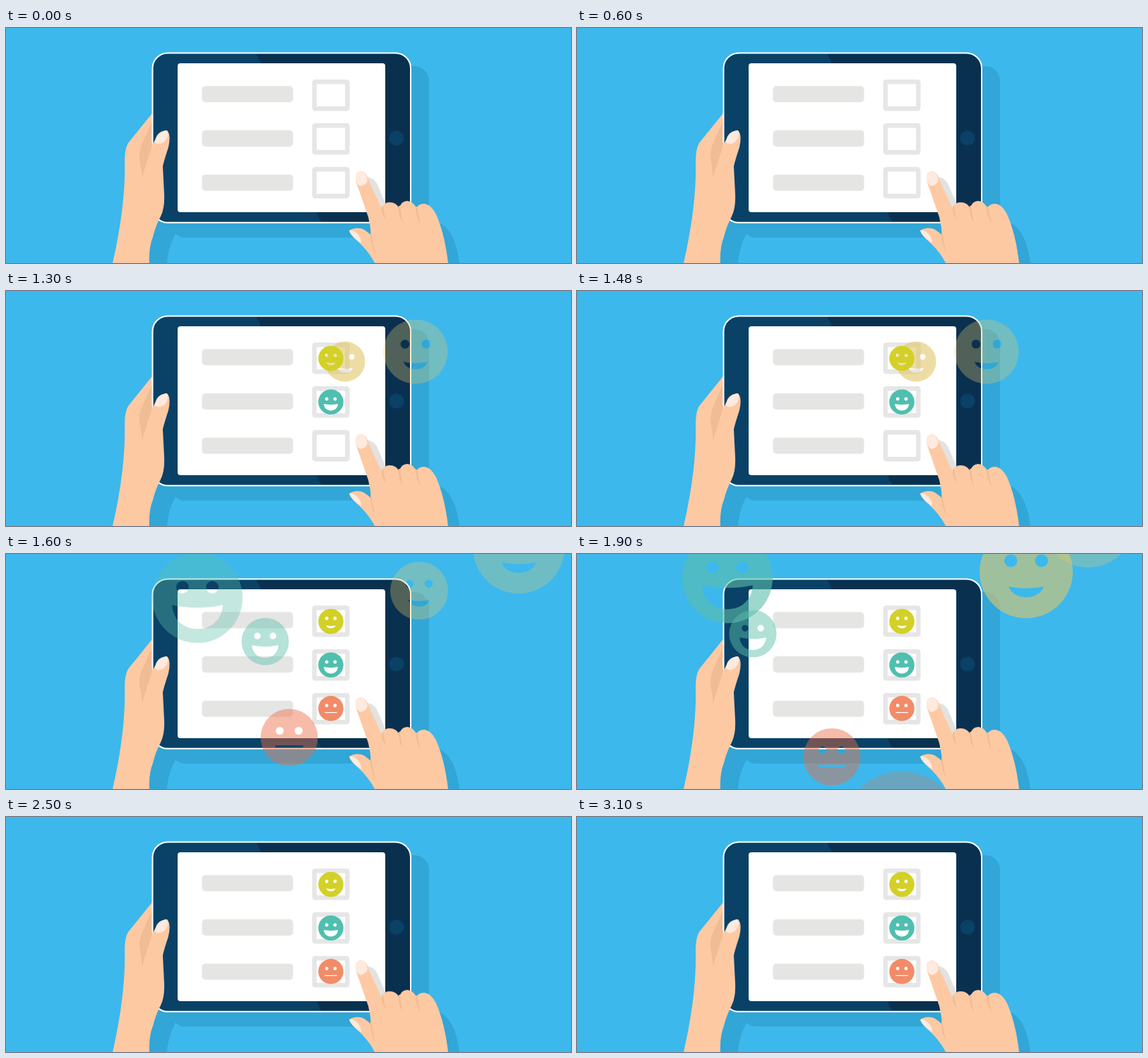
An HTML page for the animation above (3500 ms loop, 800 by 333 pixels).

```html
<!DOCTYPE html>
<html lang="en">
<head>
<meta charset="utf-8">
<title>Tablet survey</title>
<style>
  html, body { margin: 0; width: 100%; height: 100%; overflow: hidden; background: #3cb8ec; }
  svg { display: block; width: 100%; height: 100%; }
  .shadow { fill: #32a6d6; }
  .skin { fill: #fdc9a3; }
  .crease { fill: #efbc94; }
  .nail { fill: #feeade; }
</style>
</head>
<body>
<svg viewBox="0 0 800 333">
  <defs>
    <clipPath id="body"><rect x="208" y="36" width="364.5" height="239.5" rx="21"/></clipPath>
  </defs>

  <g class="shadow">
    <rect x="233" y="54" width="366" height="243" rx="21"/>
    <path d="M195 333V270H250L240 291Q229 312 228 333Z"/>
    <path d="M600 276H613Q636 286 642 333H600Z"/>
  </g>

  <!-- Fingers behind the tablet -->
  <path class="skin" d="M210 117L173 163Q168 171 168 190L210 220Z"/>
  <path class="crease" d="M210 125L193 163Q188 173 189 188L193 210L210 170Z"/>

  <rect x="207.5" y="35.5" width="365.5" height="240.3" rx="21.5" fill="#0a4166"/>
  <path d="M353 34Q359 45 361 51L440 261Q442 268 448 277H575V34Z" fill="#0a3050" clip-path="url(#body)"/>
  <rect x="207.5" y="35.5" width="365.5" height="240.3" rx="21.5" fill="none" stroke="#fff" stroke-width="2"/>
  <rect x="243" y="50" width="294" height="211" rx="4" fill="#fff"/>
  <circle cx="553" cy="156" r="10.5" fill="#0a4166"/>
  <g id="rows"></g>
  <path d="M509 211Q519 211 525 220L537 248V261H525Z" fill="#e2e2e1"/>

  <g id="floating"></g>
  <g id="answers"></g>

  <!-- Left hand -->
  <path class="skin" d="M168 186Q170 250 151 333H203Q202 311 208 296Q212 280 219 267Q225 255 224 235L222 196Q224 187 230 169Q234 151 228 145Q219 146 213 155Q209 162 207 166L193 210L189 184Z"/>
  <path class="crease" d="M189 182L193 210L196 193L207 166V162Z"/>
  <path class="nail" d="M211 162Q212 147 227 145Q231 148 228 156Q222 166 214 164Z"/>

  <!-- Right hand -->
  <path class="skin" d="M522 333Q515 319 501 305Q487 293 486 287Q493 282 503 284Q511 287 517 294Q516 280 513 268L496 219Q492 204 503 203Q510 204 514 217L532 256Q534 247 543 247Q553 247 557 256Q558 246 568 245Q578 246 581 256Q583 249 592 249Q602 250 609 264Q621 291 626 333Z"/>
  <path class="crease" d="M532 253Q531 263 538 272Q535 263 534 252ZM556 252Q555 265 562 276Q559 264 558 252ZM580 253Q580 266 587 277Q584 265 582 253ZM516 288Q515 303 523 319Q519 303 518 294Z"/>
  <path class="nail" d="M495 215Q493 204 503 203Q509 204 512 215Q511 222 502 224Q497 222 495 215ZM486 287Q490 285 497 291Q503 297 503 305Q488 295 486 287Z"/>
</svg>
<script>
const LOOP = 3500;
const STEPS = [0, 1000, 1300, 1600, 1900, 2200, 2500];

// Unit-radius faces; eyes and mouths are holes.
const circle = (x, y, r) => `M${x - r} ${y}a${r} ${r} 0 1 0 ${2 * r} 0a${r} ${r} 0 1 0 ${-2 * r} 0Z`;
const head = circle(0, 0, 1) + circle(-.33, -.235, .138) + circle(.33, -.235, .138);
const FACES = {
  smile: { solid: '#d3d027', faded: '#e1c76a', path: head + 'M-.38 .32Q0 .4 .38 .32Q.28 .55 0 .55Q-.28 .55 -.38 .32Z' },
  grin: { solid: '#4fbfaf', faded: '#5cbeaa', path: head + 'M-.56 .16Q0 .28 .56 .16C.54 .5 .3 .69 0 .69S-.54 .5 -.56 .16Z' },
  flat: { solid: '#f28b68', faded: '#ec6c40', path: head + 'M-.49 .28H.49V.36H-.49Z' }
};

// Floating faces per step: kind, x, y, radius, opacity.
const FLOATING = {
  2: [['smile', 480, 100, 28.5, .6], ['smile', 580, 86, 45.5, .32]],
  3: [['smile', 585, 52, 41, .33], ['smile', 726, -9, 65, .3],
      ['grin', 271, 62, 64, .36], ['grin', 367, 124, 33.5, .45], ['flat', 401, 260, 40.5, .45]],
  4: [['smile', 636, 25, 66, .6], ['smile', 724, -47, 66, .3],
      ['grin', 213, 34, 64, .6], ['grin', 249, 113, 33.5, .48],
      ['flat', 361, 287.5, 40.5, .45], ['flat', 460, 393, 85, .26]],
  5: [['smile', 667, -24, 66, .53], ['grin', 133, -19, 64, .6],
      ['grin', 225, 88, 33.5, .75], ['flat', 279, 349, 41, .47]]
};

const face = (kind, x, y, r, opacity) =>
  `<path d="${FACES[kind].path}" fill="${opacity ? FACES[kind].faded : FACES[kind].solid}" fill-rule="evenodd"
    opacity="${opacity || 1}" transform="translate(${x} ${y}) scale(${r})"/>`;

const layer = id => document.getElementById(id);
const floating = layer('floating');
const answers = layer('answers');

layer('rows').innerHTML = [0, 1, 2].map(i => `
  <rect x="277.5" y="${82.3 + 62.7 * i}" width="129" height="23" rx="5" fill="#e5e5e4"/>
  <rect x="436.7" y="${76.2 + 62 * i}" width="46.6" height="38" rx="1" fill="none" stroke="#e6e6e6" stroke-width="6.4"/>`).join('');

let shown = -1;
function draw() {
  const time = performance.now() % LOOP;
  const step = STEPS.findLastIndex(start => time >= start);
  if (step !== shown) {
    shown = step;
    floating.innerHTML = (FLOATING[step] || []).map(f => face(...f)).join('');
    answers.innerHTML = Object.keys(FACES).slice(0, step)
      .map((kind, i) => face(kind, 460, 95.5 + 61.7 * i, 17.8)).join('');
  }
  requestAnimationFrame(draw);
}
draw();
</script>
</body>
</html>
```
